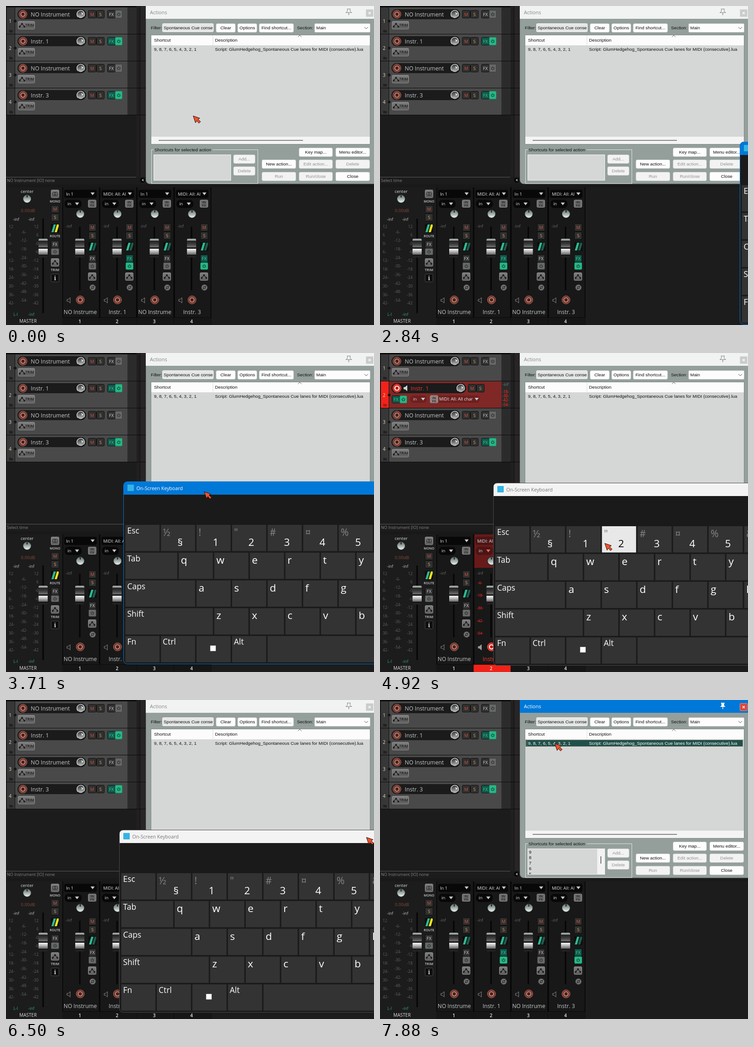
Write an HTML page that moves like this. It is 803 px wide and 698 px high and loops after 8000 ms.

```html
<!DOCTYPE html>
<html lang="en">
<head>
<meta charset="utf-8">
<title>Arming tracks</title>
<style>
  html, body { margin: 0; width: 100%; height: 100%; overflow: hidden; background: #1c1c1c; }
  svg { display: block; font-family: "Open Sans", "Noto Sans", sans-serif; white-space: pre; }
  .dialog { font-family: "Liberation Sans", Arial, sans-serif; }
</style>
</head>
<body>
<svg width="803" height="698" viewBox="0 0 803 698">
  <defs>
    <linearGradient id="cap" x2="0" y2="1">
      <stop offset="0" stop-color="#7c8a85"/><stop offset=".08" stop-color="#b4bab7"/>
      <stop offset=".12" stop-color="#222"/><stop offset=".28" stop-color="#3a3a3a"/>
      <stop offset=".46" stop-color="#707070"/><stop offset=".48" stop-color="#0c0c0c"/>
      <stop offset=".53" stop-color="#0c0c0c"/><stop offset=".55" stop-color="#f4f4f4"/>
      <stop offset=".64" stop-color="#cfcfcf"/><stop offset=".84" stop-color="#6c6c6c"/>
      <stop offset=".87" stop-color="#111"/><stop offset="1" stop-color="#2a2a2a"/>
    </linearGradient>
    <linearGradient id="plate" x2="0" y2="1">
      <stop offset="0" stop-color="#808080"/><stop offset="1" stop-color="#5c5c5c"/>
    </linearGradient>
    <linearGradient id="ball" x2="0" y2="1">
      <stop offset="0" stop-color="#333"/><stop offset=".5" stop-color="#6f7473"/>
      <stop offset="1" stop-color="#c4c8c7"/>
    </linearGradient>
    <linearGradient id="pan" x2="0" y2="1">
      <stop offset="0" stop-color="#5d6d69"/><stop offset=".5" stop-color="#a3aeab"/>
      <stop offset="1" stop-color="#f0f3f2"/>
    </linearGradient>
    <pattern id="mesh" width="4" height="4" patternUnits="userSpaceOnUse">
      <path d="M0 0h4v4h-4z" fill="#761d1d"/><path d="M0 0h2v2h-2zM2 2h2v2h-2z" fill="#591717"/>
    </pattern>
    <clipPath id="items"><path d="M322 326h152v55h-152z"/></clipPath>
  </defs>
  <g id="scene"></g>
</svg>
<script>
const LOOP = 8000;
const scene = document.getElementById('scene');

// Drawing helpers
const rect = (x, y, w, h, fill, rx = 0, stroke) => stroke
  ? `<rect x="${x + .5}" y="${y + .5}" width="${w - 1}" height="${h - 1}" rx="${rx}" fill="${fill}" stroke="${stroke}"/>`
  : `<rect x="${x}" y="${y}" width="${w}" height="${h}" rx="${rx}" fill="${fill}"/>`;
const text = (x, y, s, size, fill, attrs = '') =>
  `<text x="${x}" y="${y}" font-size="${size}" fill="${fill}" ${attrs}>${s}</text>`;
const mid = 'text-anchor="middle"', end = 'text-anchor="end"', bold = 'font-weight="600"';
const label = (x, y, s, size, fill, attrs = '') => text(x, y, s, size, fill, mid + ' ' + attrs);
const circle = (x, y, r, fill, stroke = 'none', w = 1) =>
  `<circle cx="${x}" cy="${y}" r="${r}" fill="${fill}" stroke="${stroke}" stroke-width="${w}"/>`;
const path = (d, stroke, w = 1, fill = 'none') =>
  `<path d="${d}" stroke="${stroke}" stroke-width="${w}" fill="${fill}"/>`;
const fillPath = (d, fill) => path(d, 'none', 0, fill);
const range = (n, f) => Array.from({ length: n }, (_, i) => f(i)).join('');

// Mixer and track widgets
const RED = '#f0231a';
const NAMES = ['NO Instrument', 'Instr. 1', 'NO Instrument', 'Instr. 3'];
const isMidi = i => i % 2 === 1;
const down = (x, y, fill = '#c9c9c9') => fillPath(`M${x - 4.5} ${y - 3}h9l-4.5 6z`, fill);
const button = (x, y, w, h, s, fg, bg = '#303030') =>
  rect(x, y, w, h, bg, 2, '#0e0e0e') + label(x + w / 2, y + h / 2 + 3.5, s, 9.5, fg);
const mute = (x, y, w, h) => button(x, y, w, h, 'M', '#d2553c');
const solo = (x, y, w, h) => button(x, y, w, h, 'S', '#dba765');
const fx = (x, y, w, h, on) => on
  ? button(x, y, w, h, 'FX', '#3bd39b', '#11574a') : button(x, y, w, h, 'FX', '#d5d5d5');
const power = (x, y, w, h, on) => {
  const cx = x + w / 2, cy = y + h / 2;
  return rect(x, y, w, h, on ? '#26b886' : '#686868', 2, on ? '#1a8d67' : '#3d3d3d') +
    path(`M${cx - 2} ${cy - 2}a3 3 0 1 0 4 0M${cx} ${cy - 4}v4`, '#17302a', 1.2);
};
const record = (x, y, on) =>
  circle(x, y, 10, '#140c0b') + circle(x, y, 9, on ? '#e3281f' : '#79392f', on ? '#ef665d' : '#a2695d') +
  circle(x, y, 4.5, on ? '#c4140e' : '#4a211d', on ? '#fff' : '#cfa096', on ? 2.2 : 1.6);
const speaker = (x, y, fill) =>
  path(`M${x - 4} ${y - 2}h3l4 -4v12l-4 -4h-3z`, fill, 1, fill === '#8b8b8b' ? 'none' : fill);
const trackKnob = (x, y) => circle(x, y, 10, '#101010') + circle(x, y, 8.5, 'url(#ball)') +
  path(`M${x - 6} ${y + 6}A8.5 8.5 0 1 1 ${x + 7} ${y + 5}`, '#d4d4d4', 1.5) +
  path(`M${x + 1} ${y - 4}l4 4M${x + 5} ${y - 4}v4h-4`, '#eee', 1.2);
const knob = (x, y) => circle(x, y, 9.5, '#0b0b0b') + circle(x, y, 8.5, 'url(#pan)', '#56625f') +
  path(`M${x} ${y - 8}v5`, '#141414', 1.8);
const nodes = (x, y, fill = '#1d1d1d') =>
  path(`M${x} ${y + 3}l5 -6l5 6`, fill, 1.2) +
  circle(x, y + 3, 2, fill) + circle(x + 5, y - 3, 2, fill) + circle(x + 10, y + 3, 2, fill);
const nodeButton = (x, y) => rect(x, y, 18, 18, 'url(#plate)', 2, '#8d8d8d') + nodes(x + 4, y + 9);
const inFx = (x, y, bg = '#6d6d6d') => rect(x, y, 18, 17, bg, 2, '#929292') +
  label(x + 9, y + 8, 'IN', 7.5, '#1a1a1a', bold) + label(x + 9, y + 15, 'FX', 7.5, '#1a1a1a', bold);
const route = (x, y, second) => rect(x, y, 18, 19, '#0d0d0d', 1) +
  fillPath(`M${x + 1} ${y + 18}l5 -17h5l-5 17z`, '#2fb891') +
  fillPath(`M${x + 8} ${y + 18}l5 -17h4v4l-4 13z`, second);
const fader = (x, top, bottom) => rect(x - 1.5, top, 3, bottom - top, '#050505') +
  rect(x - 10, 509, 20, 41, 'url(#cap)', 3);

function track(i, on) {
  const y = 3 + 59 * i, cy = y + 15, shift = on ? 13 : 0;
  let s = rect(2, y, 18, 58, on ? RED : '#373737') + rect(20, y, 245, 58, on ? '#7f2826' : '#494949') +
    rect(265, y, 20, 58, '#2b2b2b') + rect(0, y + 58, 305, 1, '#0a0a0a') + rect(19, y, 1, 58, '#111') +
    label(9, y + 34, i + 1, 10, '#e5dfb4') + circle(20, y + 30, 3, '#151515') +
    fillPath(`M7 ${y + 49}h3l1 1h4v5h-8z`, on ? '#a91b16' : '#222') +
    rect(25, cy - 11, 150 + shift, 22, '#1b1b1b', 11) + record(37, cy, on) +
    text(54 + shift, cy + 4.5, NAMES[i], 12.2, on ? '#ee392c' : '#c6cacc') +
    trackKnob(163 + shift, cy) + mute(179 + shift, cy - 9, 18, 18) + solo(197 + shift, cy - 9, 18, 18);
  if (!on) return s + fx(221, cy - 9, 18, 18, isMidi(i)) + power(238, cy - 9, 16, 18, isMidi(i)) +
    rect(26, cy + 15, 37, 18, 'url(#plate)', 2, '#929292') + nodes(30, cy + 24) +
    text(42, cy + 27, 'TRIM', 8, '#1a1a1a', bold);
  s += speaker(56, cy, '#d5d5d5') + fx(26, cy + 16, 18, 17, true) + power(43, cy + 16, 16, 17, true) +
    rect(66, cy + 16, 36, 16, '#6c2020', 8) + text(72, cy + 27, 'in', 9.5, '#e5d5d5') + down(94, cy + 24) +
    rect(109, cy + 16, 109, 16, '#6c2020', 8) + inFx(109, cy + 15.5, '#948080') +
    text(129, cy + 27, 'MIDI: All: All char', 9.4, '#eee') + down(211, cy + 24) +
    label(274, y + 10, '-inf', 8.5, '#777');
  return s + range(4, k => label(274, y + 25.5 + 9.4 * k, ['-18-', '-30-', '-42-', '-54-'][k], 8.5, RED, bold));
}

function strip(i, on) {
  const x = 123 + 81.3 * i, cx = x + 39, bx = Math.round(x + 57);
  return rect(x, 397, 81, 301, '#181818') + (on ? rect(x, 397, 81, 73, 'url(#mesh)') : '') +
    rect(x, 397, 1.5, 301, '#050505') + rect(x + 79.8, 397, 1.5, 301, '#050505') +
    rect(x + 4, 402, 71, 18, on ? '#4b1515' : '#080808', 4) +
    text(x + 8, 414.5, isMidi(i) ? 'MIDI: All: Al' : 'In 1', 9.4, '#e6e6e6') + down(x + 66, 411) +
    rect(x + 5, 424, 37, 18, on ? '#4b1515' : '#080808', 8) + text(x + 11, 436, 'in', 9.5, '#e6e6e6') +
    down(x + 32, 433, on ? '#ef6860' : '#c9c9c9') + inFx(bx - 1, 424) + knob(cx, 455) +
    label(x + 14, 485, '-inf', 9, '#6b6b6b') + fader(cx - 1, 483, 622) +
    (on ? range(5, k => label(x + 14, 505.5 + 27.7 * k, `-${6 + 12 * k}-`, 8, RED, bold)) : '') +
    mute(bx, 476, 17, 17) + solo(bx, 494, 17, 17) + route(bx, 517, '#1f5b4d') +
    fx(bx, 544, 17, 17, isMidi(i)) + power(bx, 561, 17, 16, isMidi(i)) + nodeButton(bx - 1, 583) +
    circle(bx + 9, 616, 6.5, '#777', '#3b3b3b') + circle(bx + 9, 616, 2.8, 'none', '#1c1c1c') +
    path(`M${bx + 5} 620l8 -8`, '#1c1c1c') + speaker(x + 14, 644, on ? '#9c9c9c' : '#8b8b8b') +
    record(cx, 643, on) + label(cx, 674, NAMES[i].slice(0, 11), 12, on ? '#ee392c' : '#c6cacc') +
    rect(x, 682, 81, 16, on ? RED : '#161616') + rect(x, 681, 81, 1, '#090909') +
    label(cx - 1, 693.5, i + 1, 10, '#e8e8e8', bold);
}

function master() {
  const db = k => k < 2 ? [12, 6][k] : (k - 2) * 6;
  return label(46, 409, 'center', 9.5, '#d9d9d9') + knob(46, 422) +
    label(48, 451, '0.00dB', 9.5, '#84483f') + label(22, 470, '-inf', 9, '#c4c4c4') +
    label(55, 470, '-inf', 9, '#c4c4c4') +
    range(10, k => text(6, 485.5 + 18.65 * k, k < 2 ? db(k) : db(k) + '-', 8.5, '#626262') +
      text(71, 485.5 + 18.65 * k, k < 2 ? db(k) : '-' + db(k), 8.5, '#626262', end)) +
    range(9, k => label(39, 497.5 + 18.7 * k, `-${6 + 6 * k}-`, 8.5, '#626262')) +
    fader(81, 465, 672) +
    rect(98, 402, 18, 18, 'url(#plate)', 2, '#8d8d8d') +
    circle(105, 411, 3.8, 'none', '#222') + circle(109, 411, 3.8, 'none', '#222') +
    label(107, 430, 'MONO', 7, '#ccc', bold) + mute(98, 436, 18, 17) + solo(98, 454, 18, 17) +
    route(98, 477, '#ecdf22') + label(107, 505.5, 'ROUTE', 7, '#ccc', bold) +
    fx(98, 513, 18, 17) + power(98, 530, 18, 15) + nodeButton(98, 552) +
    label(107, 580, 'TRIM', 7.6, '#ccc', bold) + rect(98, 586, 18, 18, '#0e0e0e', 2, '#4b4b4b') +
    label(107, 600, 'i', 12, '#e5e5e5', 'font-weight="700" font-family="Noto Serif, serif"') +
    label(21, 678, 'L-I', 9, '#2fa878') + label(55, 678, '-inf', 9, '#2fa878') +
    label(48, 693, 'MASTER', 10, '#dcdcdc');
}

function mixer({ armed, status }) {
  return rect(0, 0, 803, 698, '#1c1c1c') + rect(285, 0, 20, 374, '#202020') +
    rect(292, 0, 1, 374, '#0f0f0f') + rect(293, 0, 12, 374, '#282526') + rect(0, 0, 285, 3, '#0c0c0c') +
    range(4, i => track(i, armed === i)) + rect(0, 374, 284, 1, '#5b5b5b') +
    text(2, 384.5, status, 9, '#848484') + circle(298, 381, 5.5, '#060606') +
    fillPath('M300 378v6l-4 -3z', '#aaa') + rect(0, 390, 803, 7, '#191919') + master() +
    range(4, i => strip(i, armed === i));
}

// Actions dialog
const FONT = 9.8;
const push = (x, y, w, s, off) => rect(x, y, w, 20, off ? '#f2f3f2' : '#fdfdfd', 3, '#c7cccb') +
  label(x + w / 2, y + 13, s, FONT, off ? '#929292' : '#111');

function actions(active) {
  const ink = active ? '#fff' : '#858585', rowInk = active ? '#fff' : '#111';
  return '<g class="dialog">' + rect(305, -8, 505, 397.5, '#949f9c', 8, '#7c8785') +
    rect(305, 0, 498, 28, active ? '#0078d7' : '#f1f2f2') +
    text(314, 17.5, 'Actions', 11, ink, 'font-family="Open Sans, sans-serif"') +
    (active ? fillPath('M744 6h8v1.5h-1v5l3 2.5h-12l3 -2.5v-5h-1z', '#fff')
      : path('M744 6.5h8M745 7v5l-3.5 2.5h13l-3.5 -2.5v-5', '#858585')) +
    path('M748 14v6', ink, 1.3) +
    rect(785, 7, 17, 17, active ? '#dc4639' : '#c9cccb', 1, active ? '#f08b80' : '#dfe0e0') +
    path('M791 13l5 5m0 -5l-5 5', '#fff', 1.3) +
    text(316, 51, 'Filter:', FONT, '#111') + rect(341, 38, 112, 19, '#e5e6e6', 2, '#f9f9f9') +
    text(344, 51, 'Spontaneous Cue conse', FONT, '#111') +
    push(458, 38, 43, 'Clear') + push(505, 38, 43, 'Options') + push(552, 38, 76, 'Find shortcut...') +
    text(635, 51, 'Section:', FONT, '#111') + rect(673, 38, 122, 20, '#fdfdfd', 2, '#c7cccb') +
    text(677, 51, 'Main', FONT, '#111') + path('M782 46l4 4l4 -4', '#555') +
    rect(316, 63, 479, 240, '#d5d7d6', 0, '#7f8987') + rect(317, 64, 477, 22, '#fcfcfc') +
    rect(451, 64, 1, 22, '#ddd') + path('M637 68l4 -4l4 4', '#666') +
    text(323, 78, 'Shortcut', FONT, '#111') + text(456, 78, 'Description', FONT, '#111') +
    (active ? rect(318, 87, 474, 15, '#21504a') +
      '<rect x="320.5" y="87.5" width="471" height="14" fill="none" stroke="#d0a78c" stroke-dasharray="1 1"/>' : '') +
    text(323, 97.5, '9, 8, 7, 6, 5, 4, 3, 2, 1', FONT, rowInk) +
    text(456, 97.5, 'Script: GlumHedgehog_Spontaneous Cue lanes for MIDI (consecutive).lua', FONT, rowInk) +
    rect(317, 286, 477, 16, '#f4f4f4') + rect(333, 293, 315, 2, '#858585') +
    rect(317, 314, 233, 75, 'none', 0, '#dfe4e3') + rect(322, 310, 129, 9, '#949f9c') +
    text(324, 317.5, 'Shortcuts for selected action', FONT, '#111') +
    rect(322, 325, 169, 57, '#d5d7d6', 0, '#f2f2f2') +
    (active ? '<g clip-path="url(#items)">' + range(5, i => text(325, 336 + 12 * i, 9 - i, FONT, '#111')) + '</g>' +
      rect(474, 326, 16, 55, '#f2f2f2') + rect(481, 342, 2, 16, '#777') : '') +
    push(496, 325, 48, 'Add...', true) + push(496, 351, 48, 'Delete', true) +
    push(639, 310, 74, 'Key map...') + push(719, 310, 75, 'Menu editor...') +
    push(558, 336, 75, 'New action...') + push(639, 336, 74, 'Edit action...', true) +
    push(719, 336, 75, 'Delete', true) + push(558, 363, 75, 'Run', true) +
    push(639, 363, 74, 'Run/close', true) + push(719, 363, 75, 'Close') + '</g>';
}

// On-screen keyboard: each row is a leading wide key followed by keys on a fixed pitch
const PITCH = 77.6, KEY_W = 74.5, KEY_H = 57.5;
const ROWS = [
  ['Esc', 1, ['½§', '!1', '"2', '#3', '¤4', '%5', '&6', '/7']],
  ['Tab', 1.5, [...'qwertyui']],
  ['Caps', 2, [...'asdfghj']],
  ['Shift', 2.5, [...'zxcvbnm']],
  ['Fn', 1, ['Ctrl', '', 'Alt']]
];
const KEYS = ROWS.flatMap(([lead, units, rest], r) => {
  const y = 94 + 60.8 * r;
  const keys = [{ x: 3.5, y, w: units * PITCH - 3.1, s: lead }];
  rest.forEach((s, i) => keys.push({ x: 3.5 + (units + i) * PITCH, y, w: KEY_W, s }));
  if (r === 4) keys.push({ x: 3.5 + 4 * PITCH, y, w: 420, s: ' ' });
  return keys;
});
const escapeText = s => s.replace('&', '&amp;');

function drawKey({ x, y, w, s }, hot) {
  const ink = hot ? '#000' : '#fff';
  let face;
  if (!s) face = rect(x + 30, y + 21, 12, 12, '#fff');
  else if (s.length === 1) face = text(x + 4.5, y + 24, s, 22.5, ink);
  else if (s.length === 2 && s !== 'Fn')
    face = text(x + 4.5, y + 24, escapeText(s[0]), 21, hot ? '#7d7d7d' : '#858585') + label(x + 42, y + 46, s[1], 22.5, ink);
  else face = text(x + 4, y + 19, s, 17.4, ink);
  return rect(x, y, w, KEY_H, hot ? '#e8e8e8' : '#333') + face;
}

function keyboard([kx, ky], focused, pointer) {
  const hit = k => pointer && pointer[0] >= kx + k.x && pointer[0] < kx + k.x + k.w &&
    pointer[1] >= ky + k.y && pointer[1] < ky + k.y + KEY_H;
  return `<g transform="translate(${kx} ${ky})">` +
    rect(-1, -1, 900, 400, '#1a1a1a', 8, focused ? '#0078d7' : '#4a4a4a') +
    fillPath('M0 28V8q0 -8 8 -8H900V28z', focused ? '#0078d7' : '#f3f3f3') +
    rect(8, 6, 14, 14, '#35b4e4', 1) + text(27.5, 17.5, 'On-Screen Keyboard', 10.6, focused ? '#fff' : '#777') +
    KEYS.map(k => drawKey(k, hit(k))).join('') + '</g>';
}

const cursor = ([x, y]) => `<g transform="translate(${x} ${y})">` +
  path('M.5 .5L15 5.5L11 8L16.5 13L13 16.5L8.5 11L5.5 15.5z', '#1b0d08', 1, '#f2512b') + '</g>';

// Timing: the picture changes in bursts of [first, last, steps]
const BURSTS = [
  [0, 0, 1], [370, 610, 3], [760, 880, 2], [1030, 1150, 2], [1300, 1420, 2], [1570, 2170, 6], [2310, 2310, 1],
  [2840, 3200, 4], [3350, 3710, 4], [3860, 3980, 2], [4140, 4140, 1], [4280, 4400, 2], [4650, 4650, 1],
  [4800, 5530, 7], [5650, 5770, 2], [6020, 6740, 7], [6890, 7610, 7], [7730, 7730, 1], [7880, 7880, 1]
];
const TICKS = BURSTS.flatMap(([a, b, n]) =>
  Array.from({ length: n }, (_, k) => Math.floor((a + (b - a) * k / Math.max(1, n - 1)) / 10) * 10));

const POINTER = [
  [[0, 408, 240], [250, 408, 240], [610, 391, 121], [880, 390, 105], [1150, 349, 99], [1420, 396, 104],
    [1570, 358, 102], [2170, 723, 216]],
  [[3980, 256, 352], [4140, 345, 412], [4400, 440, 416], [4650, 440, 416], [4920, 490, 416], [5160, 545, 408],
    [5530, 490, 416], [5770, 488, 422], [6020, 488, 415], [6500, 786, 300]],
  [[6890, 786, 330], [7250, 590, 190], [7610, 381, 106], [7730, 381, 97], [7880, 381, 95], [LOOP, 381, 95]]
];
const BOARD = [[2840, 786, 298], [3080, 520, 277], [3200, 417, 294], [3590, 215, 253], [3710, 257, 282],
  [3860, 262, 294], [3980, 248, 285], [6610, 248, 285]];

function along(points, t) {
  const last = points[points.length - 1];
  if (t < points[0][0] || t > last[0]) return null;
  const i = points.findIndex(p => p[0] >= t);
  const b = points[i], a = points[Math.max(0, i - 1)];
  const u = b === a ? 0 : (t - a[0]) / (b[0] - a[0]);
  return [1, 2].map(k => Math.round(a[k] + (b[k] - a[k]) * u));
}

// While the keyboard window is dragged, the pointer holds its title bar
function pointerAt(t, board) {
  if (board && t < 3980) return [board[0] + 175, board[1] + 21];
  return along(POINTER.findLast(leg => t >= leg[0][0]), t);
}

function draw(t) {
  const board = along(BOARD, t);
  const pointer = pointerAt(t, board);
  const armed = t >= 4650 && t < 5280 ? 1 : t >= 5280 && t < 6140 ? 3 : -1;
  const status = t >= 2310 && t < 3860 ? 'Select time' : 'NO Instrument [IO] none';
  scene.innerHTML = mixer({ armed, status }) + actions(t >= 7880) +
    (board ? keyboard(board, t < 3980, pointer) : '') + (pointer ? cursor(pointer) : '');
}

let shown = -1;
function frame() {
  const t = performance.now() % LOOP;
  const tick = TICKS.findLast(k => k <= t);
  if (tick !== shown) draw(shown = tick);
  requestAnimationFrame(frame);
}
frame();
</script>
</body>
</html>
```
